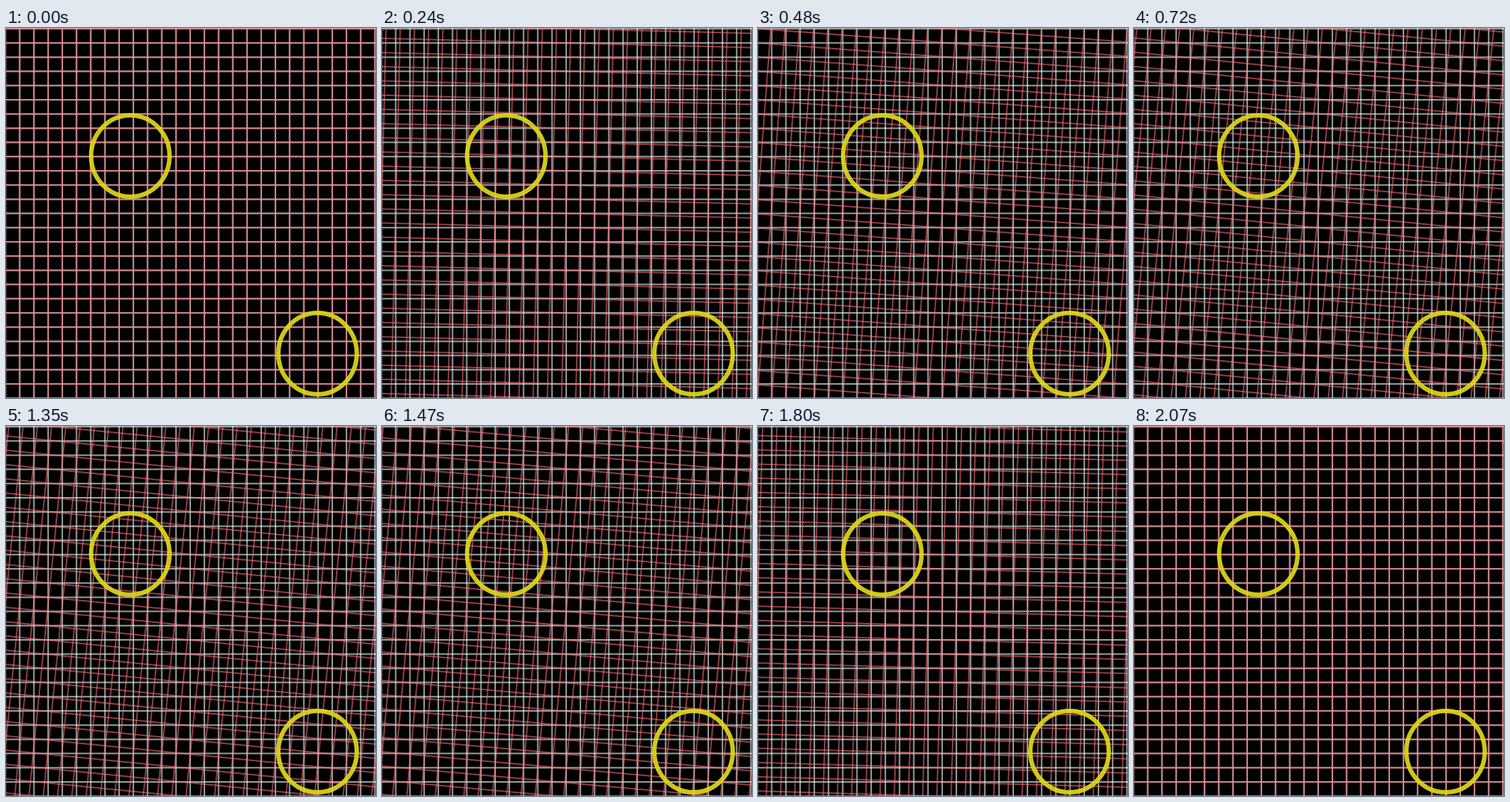
These frames come from a looping animation (500x500 px, 2.25 s). An HTML page:

```html
<!DOCTYPE html>
<html lang="en">
<head>
<meta charset="utf-8">
<title>Rotating grids</title>
<style>
  html, body { margin: 0; width: 100%; height: 100%; overflow: hidden; background: #000; }
  svg { display: block; width: 100%; height: 100%; }
  path { fill: none; stroke-width: 2; }
  .base { stroke: rgba(240, 255, 250, .62); }
  .turn { stroke: rgba(255, 115, 125, .55); }
  ellipse { fill: none; stroke: #e0d818; stroke-width: 6; stroke-opacity: .92; }
</style>
</head>
<body>
<svg viewBox="0 0 500 500">
  <g class="base"><path/><path/></g>
  <g class="turn"><path/><path/></g>
  <ellipse cx="168" cy="173" rx="53" ry="55"/>
  <ellipse cx="421" cy="440" rx="53" ry="55"/>
</svg>
<script>
  const CELL = 19.2, CX = 248.9, CY = 250.6, REACH = 17;
  const LOOP = 2250, STEP = 30;
  const MAX = Math.atan(0.1) * 180 / Math.PI;

  const line = (d, k) => d(k * CELL, REACH * CELL);
  const lines = d => Array.from({ length: 2 * REACH + 1 }, (_, i) => line(d, i - REACH)).join('');
  const columns = lines((p, r) => `M${CX + p} ${CY - r}v${2 * r}`);
  const rows = lines((p, r) => `M${CX - r} ${CY + p}h${2 * r}`);

  for (const g of document.querySelectorAll('g')) {
    g.children[0].setAttribute('d', columns);
    g.children[1].setAttribute('d', rows);
  }

  const turn = document.querySelector('.turn');
  const ease = p => (1 - Math.cos(Math.PI * Math.min(1, Math.max(0, p)))) / 2;

  // 24 steps out, a hold, 25 steps back
  function angle(n) {
    return MAX * (n < 44 ? ease(n / 24) : ease((69 - n) / 25));
  }

  function draw() {
    const n = Math.floor(performance.now() % LOOP / STEP);
    turn.setAttribute('transform', `rotate(${angle(n)} ${CX} ${CY})`);
    requestAnimationFrame(draw);
  }
  draw();
</script>
</body>
</html>
```
